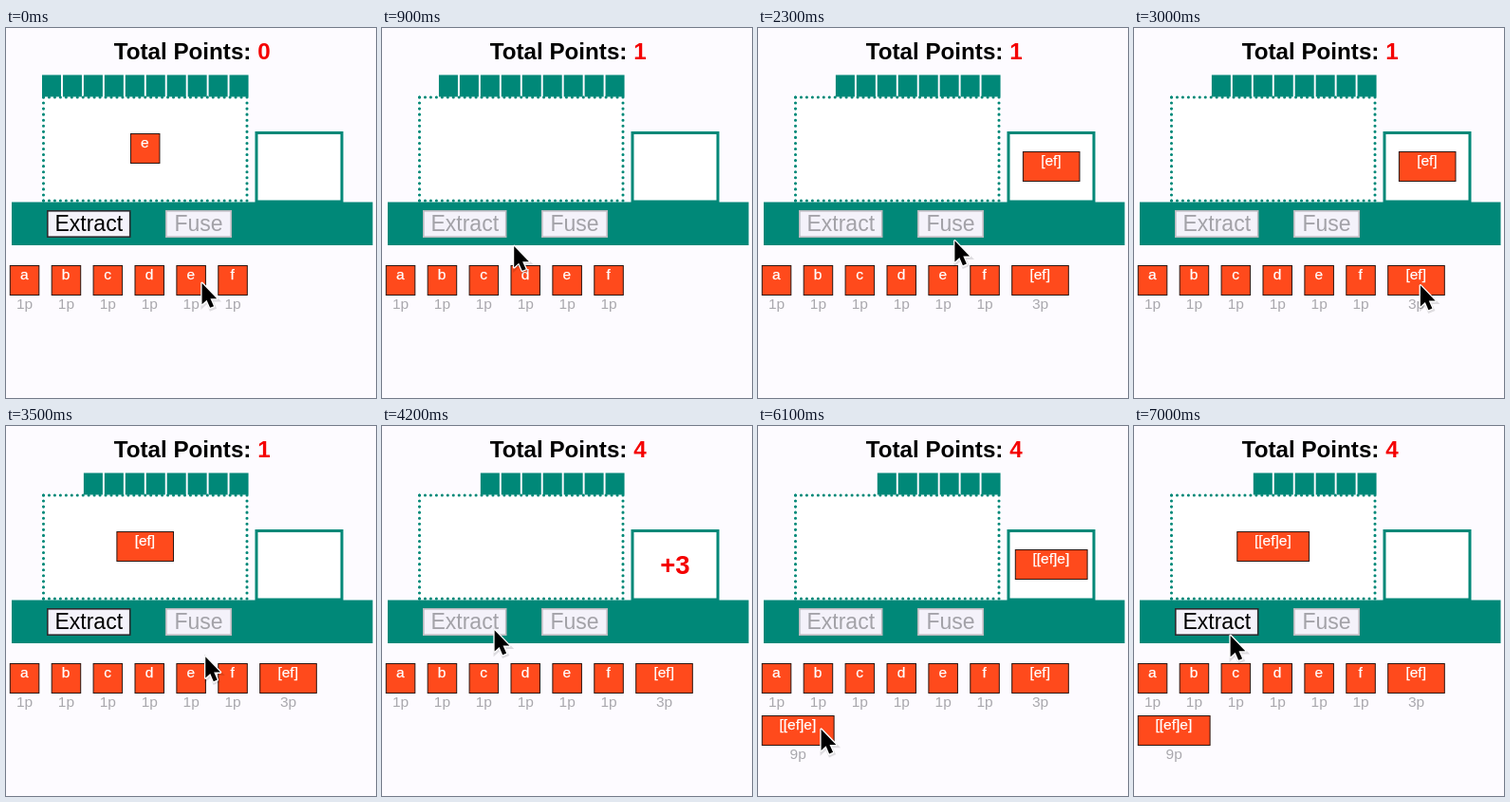
An HTML page for the animation above (7100 ms loop, 390x390 px).

```html
<!DOCTYPE html>
<html lang="en">
<head>
<meta charset="utf-8">
<title>Fuse and extract</title>
<style>
  html, body { margin: 0; width: 100%; height: 100%; overflow: hidden; background: #fdfbff; }
  svg { display: block; width: 100vw; height: 100vh; font-family: "Liberation Sans", Arial, sans-serif; }
  text { text-anchor: middle; }
</style>
</head>
<body>
<svg id="stage" viewBox="0 0 390 390"></svg>
<script>
const LOOP = 7100, STEP = 100, LINGER = 400;
const TEAL = '#008878', ORANGE = '#ff4a1c', RED = '#f40000', GAP = 12.4;
const BUTTONS = { Extract: { x: 43, w: 88.5 }, Fuse: { x: 168, w: 70 } };

// The whole game as clicks: time, what is clicked, how far right of its middle
const CLICKS = [
  [0, 'e', 11], [400, 'Extract', 28], [1200, 'e', 11], [1800, 'f', 1], [2300, 'Fuse', 4],
  [3100, '[ef]', 4], [3900, 'Extract', 31], [4700, 'e', 11], [5200, '[ef]', 17],
  [5500, 'Fuse', 4], [6200, '[[ef]e]', 24], [LOOP, 'Extract', 14]
].map(([at, on, dx]) => ({ at, on, dx }));

// Every level of brackets triples the worth.
const worth = name => 3 ** (name.split('[').length - 1);
const widthOf = name => name.length < 2 ? 31.5 : 39 + 5.4 * name.length;

function flow(names) {
  let x = 3.8, y = 250;
  return names.map(name => {
    const w = widthOf(name);
    if (x + w > 390) { x = 3.8; y += 55; }
    const spot = { name, x, y, w };
    x += w + GAP;
    return spot;
  });
}
const SHELF = flow([...'abcdef', '[ef]', '[[ef]e]']);

function stateAt(t) {
  const s = { chamber: [], out: '', used: 0, score: 0, made: 0 };
  for (const { at, on } of CLICKS) {
    if (at > t) break;
    s.out = '';
    if (on === 'Fuse') {
      // Longer parts come first in the compound.
      const parts = [...s.chamber].sort((a, b) => b.length - a.length);
      s.out = `[${parts.join('')}]`;
      s.made++;
    } else if (on === 'Extract') {
      const points = worth(s.chamber[0]);
      s.score += points;
      if (t < at + LINGER) s.out = '+' + points;
    } else {
      s.chamber.push(on);
      continue;
    }
    s.chamber = [];
    s.used++;
  }
  return s;
}

// The pointer lands on a slight slant, higher towards the right.
function aim({ on, dx }) {
  const b = BUTTONS[on] || SHELF.find(s => s.name === on);
  return [b.x + b.w / 2 + dx, (b.y ? b.y + 21 : 224) - dx / 3];
}

function pointerAt(t) {
  const i = CLICKS.findIndex(c => c.at > t), from = CLICKS[i - 1], to = CLICKS[i];
  const leave = from.at + (from.on === 'Extract' ? LINGER : 100), arrive = to.at - 100;
  const k = Math.min(1, Math.max(0, (t - leave) / (arrive - leave))), e = k * k * (3 - 2 * k);
  const [x0, y0] = aim(from), [x1, y1] = aim(to);
  return [x0 + (x1 - x0) * e, y0 + (y1 - y0) * e];
}

const rect = (x, y, w, h, fill, stroke = 'none', sw = 0) =>
  `<rect x="${x}" y="${y}" width="${w}" height="${h}" fill="${fill}" stroke="${stroke}" stroke-width="${sw}"/>`;
const label = (x, y, size, fill, str, extra = '') =>
  `<text x="${x}" y="${y}" font-size="${size}" fill="${fill}" ${extra}>${str}</text>`;
const BOLD = 'font-weight="700"', FIRM = 'stroke="#fff" stroke-width=".25"';

function dots(x1, y1, x2, y2) {
  const length = Math.hypot(x2 - x1, y2 - y1), pitch = length / Math.round(length / 6);
  return `<path d="M${x1} ${y1}L${x2} ${y2}" stroke="${TEAL}" stroke-width="3.1" stroke-linecap="round" stroke-dasharray="0 ${pitch}"/>`;
}

function item(name, x, y) {
  const w = widthOf(name);
  return rect(x + .5, y + .5, w - 1, 31, ORANGE, '#2a1510', 1) +
    label(x + w / 2 - .3, y + 15, 15.5, '#fff', name, FIRM);
}

const shelfItem = ({ name, x, y, w }) =>
  item(name, x, y) + label(x + w / 2, y + 46, 15.5, '#a9a8ad', worth(name) + 'p');

function button(name, on) {
  const { x, w } = BUTTONS[name];
  return rect(x + .8, 192.8, w - 1.6, 27.4, '#f4f2fa', on ? '#2b2b2e' : '#bab9be', 1.6) +
    label(x + w / 2, 214, 23, on ? '#000' : '#a3a2a8', name);
}

function row(names, mid, y) {
  let x = mid - names.reduce((sum, n) => sum + widthOf(n) + GAP, -GAP) / 2;
  return names.map(n => {
    const left = x;
    x += widthOf(n) + GAP;
    return item(n, left, y);
  }).join('');
}

function pointer([x, y]) {
  const d = 'M0 0V25L5.6 19.8L9.6 29L14 27.1L10 18.2H17.6Z';
  return `<g transform="translate(${x + .4} ${y + 1.7}) scale(.89)">` +
    `<path d="${d}" transform="translate(.8 1.8)" fill="none" stroke="#000" stroke-opacity=".12" stroke-width="4"/>` +
    `<path d="${d}" stroke="#fff" stroke-width="3" paint-order="stroke" stroke-linejoin="round"/></g>`;
}

function draw(t) {
  const s = stateAt(t);
  let out = rect(0, 0, 390, 390, '#fdfbff') +
    label(196.2, 33, 24.2, '#000', `Total Points: <tspan fill="${RED}">${s.score}</tspan>`, BOLD);

  out += rect(38, 72, 217.5, 112, '#fff');
  for (let i = s.used; i < 10; i++) out += rect(38 + i * 21.95, 49.5, 20, 23, TEAL);
  const [l, t0, r, b] = [39.5, 73, 254, 182];
  out += dots(l, t0, r, t0) + dots(l, b, r, b) + dots(l, t0, l, b) + dots(r, t0, r, b);

  out += rect(264, 110.5, 90, 72.5, '#fff', TEAL, 3) + rect(6, 183.5, 380.5, 45.5, TEAL);
  out += button('Extract', s.chamber.length === 1) + button('Fuse', s.chamber.length === 2);

  out += row(s.chamber, 146.7, 111);
  if (s.out[0] === '+') out += label(309, 156, 27.5, RED, s.out, BOLD);
  else if (s.out) out += row([s.out], 309.2, 130);

  out += SHELF.slice(0, 6 + s.made).map(shelfItem).join('');
  stage.innerHTML = out + pointer(pointerAt(t));
}

const stage = document.getElementById('stage');
const start = performance.now();
let last = -1;
function tick() {
  const t = Math.floor(((performance.now() - start) % LOOP) / STEP) * STEP;
  if (t !== last) draw(last = t);
  requestAnimationFrame(tick);
}
tick();
</script>
</body>
</html>
```
